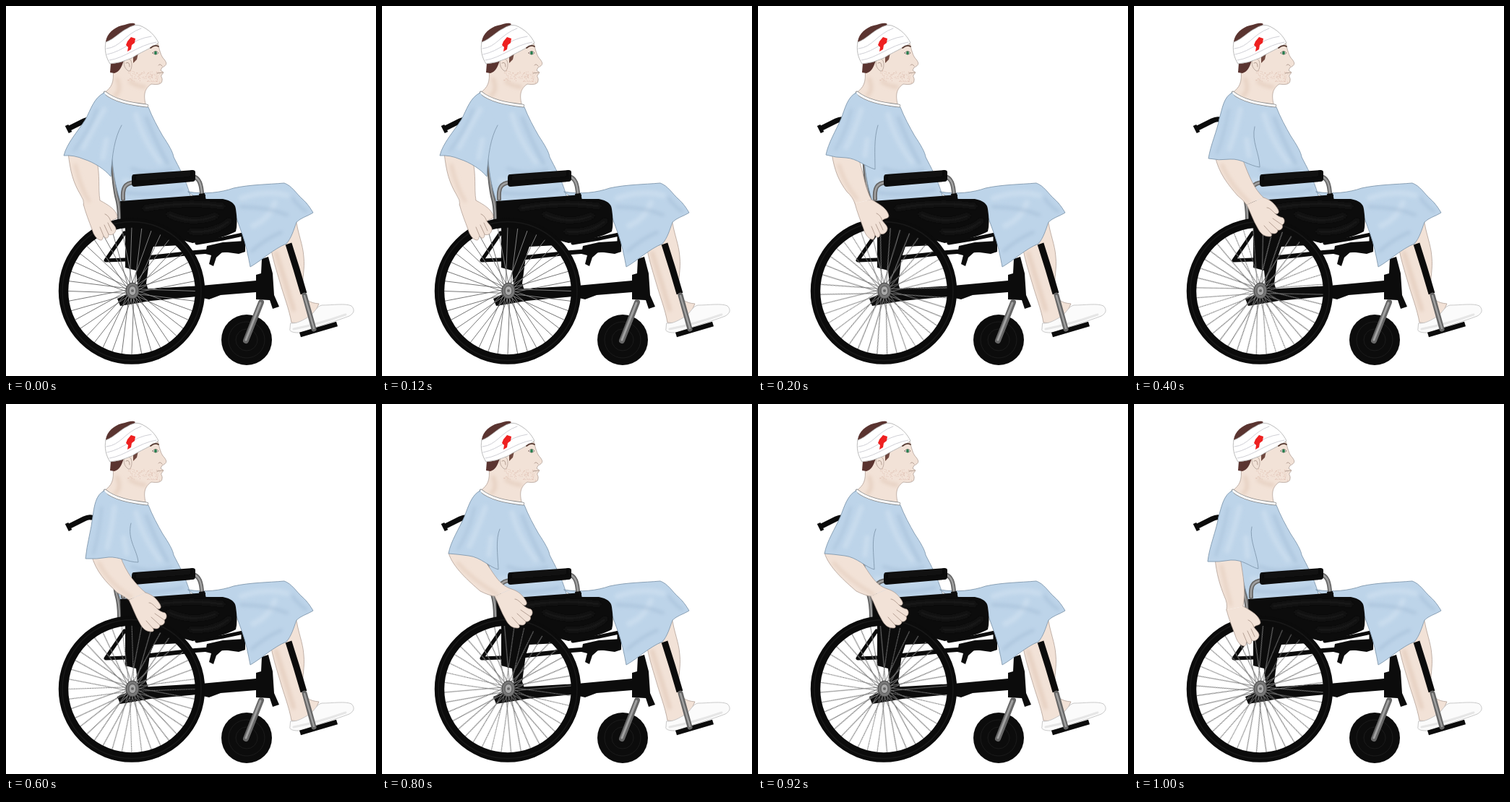
An HTML page for the animation above (1200 ms loop, 512x512 px).

```html
<!DOCTYPE html>
<html lang="en">
<head>
<meta charset="utf-8">
<title>Wheelchair</title>
<style>
  html, body { margin: 0; width: 100%; height: 100%; overflow: hidden; background: #fff; }
  svg { display: block; width: 100vw; height: 100vh; background: #fff; }
  path, line { stroke-linecap: round; stroke-linejoin: round; }
  .skin { fill: #f2e2d7; stroke: #a8968b; stroke-width: .7; }
  .gown { fill: #bdd4e9; stroke: #8299ae; stroke-width: .9; }
  .black { fill: #0c0c0c; }
  .line { fill: none; }
  .bar { fill: none; stroke: #0b0b0b; }
  .tube { fill: none; stroke: #666; }
  .shine { fill: none; stroke: #a0a0a0; }
  .light { fill: none; stroke: #cfe0f0; opacity: .7; filter: url(#soft); }
  .dark { fill: none; stroke: #a6bfd8; opacity: .75; filter: url(#soft); }
  .warm { fill: none; stroke: #e6d0c1; filter: url(#soft); }
  .crease { fill: none; stroke: #a58f82; stroke-width: .8; }
  .gloss { fill: none; stroke: #1d1d1d; filter: url(#soft); }
  /* Difference keeps spokes dark on white and light on black. */
  #spokes { mix-blend-mode: difference; transform-origin: 174px 394.5px; animation: roll 1.2s steps(6) infinite; }
  @keyframes roll { to { transform: rotate(90deg); } }
  .pose { visibility: hidden; animation: show 1.2s step-end infinite; animation-delay: calc(var(--i) * .2s - 1.2s); }
  @keyframes show { 0% { visibility: visible; } 16.6667%, 100% { visibility: hidden; } }
</style>
</head>
<body>
<svg viewBox="0 0 512 512">
  <defs>
    <filter id="soft" x="-50%" y="-50%" width="200%" height="200%"><feGaussianBlur stdDeviation="2.6"/></filter>
    <g id="grip">
      <path class="skin" d="M134 273C137 285 142 297 146 308C148 315 152 322 158 323C161 323 161 320 162 317C165 322 169 321 169 315C173 317 178 314 179 309C180 305 175 301 172 297C175 293 181 295 181 290C179 281 170 275 157 268"/>
      <path class="crease" d="M162 317L157 305M169 315L163 302M173 310L168 299M172 297C170 291 167 288 164 287"/>
    </g>
    <g id="open">
      <path class="skin" d="M156 275C161 285 165 297 171 307C175 315 180 319 187 319C191 319 191 317 189 314C194 316 199 315 199 310C203 311 207 307 205 303C209 301 209 295 206 293C201 292 198 290 195 287C199 289 202 286 199 281C195 274 189 268 179 265"/>
      <path class="crease" d="M189 314L180 304M199 310L187 299M205 303L192 294M195 287C190 282 187 279 184 279"/>
    </g>
  </defs>

  <!-- handle and back post -->
  <path class="bar" stroke-width="7" d="M88 169L108 159Q114 156 118 157"/>
  <path class="bar" stroke-width="5" style="stroke-linecap:butt" d="M84 165L89 175"/>
  <path class="tube" stroke-width="6" d="M147 205Q149 245 153 263Q157 276 157 295"/>
  <path class="shine" stroke-width="2" d="M147 205Q149 245 153 263Q157 276 157 295"/>

  <!-- lower frame -->
  <path class="black" d="M165 300L214 308L242 331L204 333L199 347L194 384L198 396L183 394L180 366L165 362Z"/>
  <path class="bar" stroke-width="5" d="M164 314L138 352L165 351"/>
  <path class="bar" stroke-width="6" d="M190 349L262 341L328 336"/>
  <path class="black" d="M154 405L185 392L270 387L346 380V396L297 400L281 406L264 402L200 408L158 415Z"/>
  <path class="bar" stroke-width="5" d="M264 328L300 322L328 316V338"/>
  <path class="black" d="M278 332L300 327L331 325L331 340L322 343L300 340L291 348L287 360L281 357L284 345L276 343Z"/>
  <path class="black" d="M354 350L363 347L369 370L371 400L378 416L369 419L365 407L346 406V372L353 370Z"/>

  <!-- caster -->
  <circle class="black" cx="333" cy="462" r="35"/>
  <g class="line" stroke="#1b1b1b"><circle cx="333" cy="462" r="25"/><circle cx="333" cy="462" r="15"/></g>
  <path class="tube" stroke-width="8" d="M353 410L332 463"/>
  <path class="shine" stroke-width="3" d="M352 411L332 462"/>

  <!-- leg and foot -->
  <path class="skin" d="M366 332C369 350 374 365 379 382C384 400 392 420 395 438L420 440L433 412C421 411 414 407 411 397C409 380 414 364 412 347C411 330 404 316 401 294Z"/>
  <path class="warm" stroke-width="6" d="M374 342Q386 380 398 420"/>
  <path d="M394 439C403 440 412 434 419 430C428 424 429 416 437 414C452 414 470 411 478 415C483 420 482 425 475 429C455 437 430 443 412 451C403 453 395 452 393 449Z" fill="#fbfbfb" stroke="#bbb" stroke-width=".8"/>
  <path class="line" stroke="#e6e6e6" stroke-width="3" d="M398 447Q430 441 470 427"/>
  <path class="bar" style="stroke-linecap:butt" stroke-width="7" d="M407 455L458 440"/>
  <path class="bar" style="stroke-linecap:butt" stroke-width="9" d="M391 329Q402 363 412 398"/>
  <path class="tube" stroke-width="7" d="M413 400L426 447"/>
  <path class="shine" stroke-width="2.5" d="M413 401L426 446"/>

  <!-- head -->
  <path class="skin" d="M148 88C150 106 146 113 136 120L160 140H194C191 127 189 116 201 108C208 109 216 109 216 103C217 100 214 98 215 96L218 92L214 89L216 85C223 82 223 79 219 74C214 69 213 62 210 52L170 55Z"/>
  <path class="warm" stroke-width="5" d="M154 101Q160 117 151 124M192 112Q181 111 172 105"/>
  <g id="stubble" fill="#dcbcae"></g>
  <path d="M138 49C140 38 149 30 160 27C169 25 175 22 179 25L171 35L140 52ZM145 79L163 75C160 85 157 91 150 93L144 92Z" fill="#5a3430"/>
  <path d="M176 68L183 65L181 74L176 79Z" fill="#70483f"/>
  <path class="skin" d="M163 77C168 70 174 73 174 81C174 88 171 92 168 89Q163 85 163 77Z"/>
  <path class="crease" d="M166 79Q171 76 171 84"/>
  <path d="M138 50C151 45 157 36 168 31Q177 25 185 27C198 32 207 42 211 51C202 58 184 65 174 72Q159 79 144 80C138 71 136 60 138 50Z" fill="#fff" stroke="#aaa" stroke-width=".8"/>
  <path class="line" stroke="#d0d0d6" d="M139 59C159 57 164 39 187 31M140 67C164 62 174 46 201 42M143 75C165 72 183 54 208 50"/>
  <path d="M168 49L173 43L179 45L178 51L174 54L173 60L168 63L169 57L166 54Z" fill="#ee2020"/>
  <path d="M200 58Q206 53 211 56" class="line" stroke="#573b32" stroke-width="1.8"/>
  <path d="M203 65Q207 60 211 65Q207 69 203 65Z" fill="#fff" stroke="#685048" stroke-width=".7"/>
  <ellipse cx="207" cy="65" rx="1.9" ry="2.4" fill="#287c4c"/>
  <path class="crease" d="M209 93L217 92M211 82Q213 79 216 83"/>

  <!-- gown -->
  <path class="gown" d="M136 119C146 130 172 138 197 140C202 153 210 168 217 180C225 192 231 202 232 209C239 223 248 238 255 262L253 275L160 275C153 256 149 237 147 213C144 182 137 150 130 130Z"/>
  <path d="M137 120C150 131 170 135 195 138" class="line" stroke="#888" stroke-width="4.5"/>
  <path d="M137 120C150 131 170 135 195 138" class="line" stroke="#fafafa" stroke-width="3"/>
  <path class="light" stroke-width="7" d="M180 150Q189 185 213 216M164 242Q202 250 238 240"/>
  <path class="dark" stroke-width="4" d="M194 154Q207 188 224 218M174 225Q200 235 229 226M165 258Q205 264 245 254"/>
  <path class="gown" d="M252 257C275 261 298 258 315 252C338 247 362 247 385 245C396 249 402 260 410 267C417 273 422 281 425 286C417 291 408 293 402 299C398 310 395 321 388 329C370 336 354 352 338 361C335 345 332 330 327 316L314 280L270 270Z"/>
  <path class="light" stroke-width="8" d="M326 266Q360 254 389 262M342 304Q364 295 372 272"/>
  <path class="dark" stroke-width="4" d="M325 278Q361 278 389 289M340 339Q361 321 381 313M397 266Q405 278 415 284"/>

  <!-- side panel and armrest -->
  <path class="black" d="M158 270L252 263L276 261V267H300Q317 270 318 281Q321 300 318 312Q300 322 258 328L213 315L159 297Z"/>
  <path class="gloss" stroke-width="4" d="M192 280Q250 269 300 277M255 312Q290 315 309 297M225 288Q258 304 291 290"/>
  <path class="tube" stroke-width="6" d="M162 267C161 252 164 245 178 244M258 236Q270 237 271 260"/>
  <path class="shine" stroke-width="2.5" d="M162 267C161 252 164 245 178 244M258 236Q270 237 271 260"/>
  <path class="black" d="M267 260L275 259L277 269H268ZM177 233L258 227Q262 227 262 230V239Q262 243 258 243L178 250Q174 250 174 246V238Q174 233 177 233Z"/>
  <path class="gloss" stroke-width="3" d="M181 238L254 232"/>

  <!-- main wheel -->
  <g id="spokes" stroke="#9a9a9a" stroke-width=".9"></g>
  <circle class="bar" cx="174" cy="394.5" r="94.5" stroke-width="13.5"/>
  <circle class="line" cx="174" cy="394.5" r="96" stroke="#181818" stroke-width="1.5"/>
  <ellipse cx="175" cy="394" rx="9" ry="11" fill="#777" stroke="#444"/>
  <ellipse cx="175" cy="394" rx="5" ry="6.5" fill="#aaa" stroke="#555"/>
  <circle cx="175" cy="394" r="2" fill="#666"/>

  <!-- arm poses -->
  <g class="pose" style="--i:0">
    <path class="skin" d="M130 269C127 250 131 237 125 210L86 203C89 230 93 244 103 261Q108 268 108 276"/>
    <use href="#grip" x="-27" y="1"/>
    <path class="warm" stroke-width="4" d="M96 220Q103 251 115 270"/>
    <path class="gown" d="M160 165C150 183 147 205 145 236C137 226 121 216 108 212Q94 206 80 207C84 190 99 174 110 157C117 144 122 126 136 120"/>
    <path class="light" stroke-width="7" d="M136 143Q118 174 107 196M139 185L134 210"/>
    <path class="dark" stroke-width="3" d="M126 143Q114 174 94 200"/>
  </g>
  <g class="pose" style="--i:1">
    <path class="skin" d="M157 268C148 252 147 235 139 210L102 204C106 229 112 242 123 257Q131 264 134 273"/>
    <use href="#grip"/>
    <path class="warm" stroke-width="4" d="M112 220Q120 246 137 267"/>
    <path class="gown" d="M166 165C160 184 162 205 162 226C148 222 137 211 122 210Q108 210 94 206C97 190 108 172 115 156C120 143 124 125 136 120"/>
    <path class="light" stroke-width="7" d="M143 143Q134 174 122 196M151 185L148 207"/>
    <path class="dark" stroke-width="3" d="M129 143Q122 174 107 199"/>
  </g>
  <g class="pose" style="--i:2">
    <path class="skin" d="M179 265C167 254 159 236 150 211L112 207C117 231 130 247 143 262Q151 268 156 275"/>
    <use href="#open"/>
    <path class="warm" stroke-width="4" d="M122 220Q133 247 159 271"/>
    <path class="gown" d="M167 167C162 187 174 204 174 223C159 221 149 211 133 212Q117 214 103 211C106 192 115 173 118 156C122 143 124 125 136 120"/>
    <path class="light" stroke-width="7" d="M147 143Q141 174 132 198M156 185L159 207"/>
    <path class="dark" stroke-width="3" d="M131 143Q126 174 115 204"/>
  </g>
  <g class="pose" style="--i:3">
    <path class="skin" d="M193 261C180 250 166 234 158 210L118 208C124 232 139 247 154 261Q165 267 170 271"/>
    <use href="#open" x="14" y="-4"/>
    <path class="warm" stroke-width="4" d="M129 220Q142 247 173 267"/>
    <path class="gown" d="M173 165C167 187 182 203 183 219C169 219 156 211 142 212Q125 215 110 214C112 193 118 174 120 156C122 142 124 125 136 120"/>
    <path class="light" stroke-width="7" d="M150 143Q146 174 140 199M163 185L167 207"/>
    <path class="dark" stroke-width="3" d="M132 143Q130 174 121 207"/>
  </g>
  <g class="pose" style="--i:4">
    <path class="skin" d="M179 256C161 250 155 235 136 207L92 206C98 226 120 245 136 259Q148 265 156 266"/>
    <use href="#open" y="-9"/>
    <path class="warm" stroke-width="4" d="M105 220Q125 243 159 263"/>
    <path class="gown" d="M163 173C157 187 160 207 161 229C149 226 137 212 120 210Q106 208 92 207C95 190 107 172 114 156C119 143 124 125 136 120"/>
    <path class="light" stroke-width="7" d="M143 143Q132 174 121 197M151 185L148 209"/>
    <path class="dark" stroke-width="3" d="M128 143Q121 174 105 201"/>
  </g>
  <g class="pose" style="--i:5">
    <path class="skin" d="M151 280C155 259 151 237 147 213L112 213C114 235 119 251 125 266Q130 276 128 285"/>
    <use href="#grip" x="-6" y="12"/>
    <path class="warm" stroke-width="4" d="M121 224Q127 252 134 278"/>
    <path class="gown" d="M163 170C159 188 171 208 172 228C160 225 151 215 134 216Q117 219 102 218C104 198 114 175 117 156C121 143 124 125 136 120"/>
    <path class="light" stroke-width="7" d="M146 143Q139 174 129 203M155 185L157 211"/>
    <path class="dark" stroke-width="3" d="M130 143Q125 174 113 210"/>
  </g>
</svg>
<script>
  const add = (id, tag, attrs) => {
    const el = document.createElementNS('http://www.w3.org/2000/svg', tag);
    for (const k in attrs) el.setAttribute(k, attrs[k]);
    document.getElementById(id).append(el);
  };

  // Spokes leave the hub slightly off-radial, alternating sides.
  const count = 40;
  const at = (r, a) => [174 + r * Math.cos(a), 394.5 + r * Math.sin(a)];
  for (let i = 0; i < count; i++) {
    const a = i / count * Math.PI * 2;
    const [x1, y1] = at(8, a + (i % 2 ? .35 : -.35));
    const [x2, y2] = at(89, a);
    add('spokes', 'line', { x1, y1, x2, y2 });
  }

  let seed = 7;
  const rand = () => (seed = seed * 16807 % 2147483647) / 2147483647;
  for (let i = 0; i < 110; i++) {
    const u = rand();
    add('stubble', 'circle', { cx: 169 + u * 44, cy: 89 + rand() * 15 + u * 2, r: .5 });
  }
</script>
</body>
</html>
```
